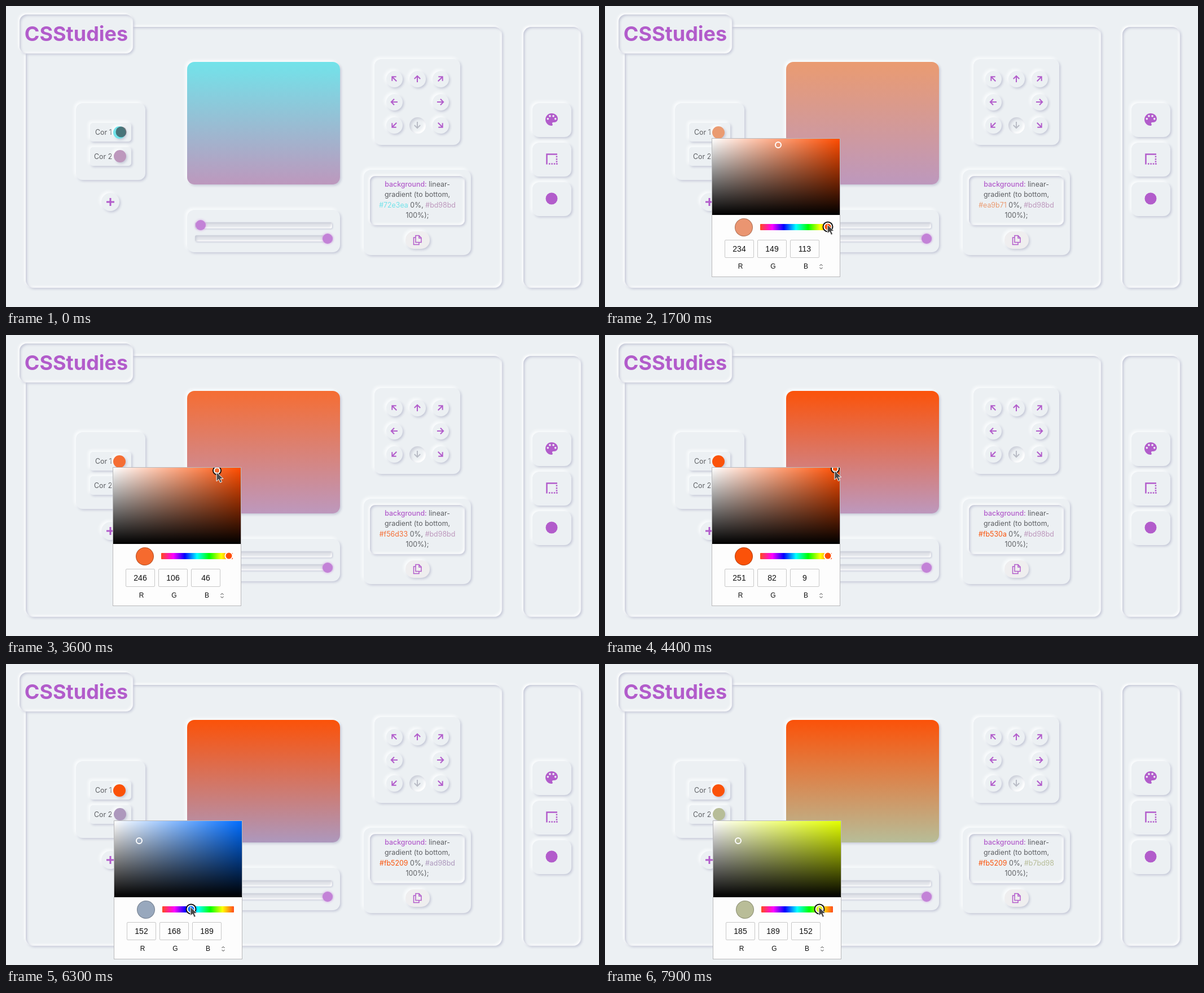
An HTML page that plays this animation: 1051 by 533 pixels, repeating every 8 s.

```html
<!DOCTYPE html>
<html lang="pt">
<head>
<meta charset="utf-8">
<title>CSStudies</title>
<style>
html, body { margin: 0; width: 100%; height: 100%; overflow: hidden; background: #ecf0f3; }
#stage { position: relative; width: 1051px; height: 533px; overflow: hidden;
  font: 12.4px/18.3px Inter, sans-serif; color: #5d5f63; --purple: #b25ccb; }
#stage div, #stage svg { position: absolute; box-sizing: border-box; }
.raised, .ring { background: #ecf0f3; }
.raised { box-shadow: -3px -3px 5px #fafcfd, 2px 2px 4px #c3c6d6; }
.ring { box-shadow: -2px -2px 4px #fff, 2px 2px 4px #c3c6d6,
  inset 2px 2px 4px #c3c6d6, inset -2px -2px 4px #fff; }
.pressed { box-shadow: inset 3px 3px 4px #cdd0da, inset -3px -3px 4px #fff; }
.track { background: #e4e6eb; box-shadow: 1px 1px 3px #c3c6d6,
  inset 2px 2px 4px #c6c9d5, inset -2px -2px 3px #fff; }
.thumb { background: #c382d7; box-shadow: 0 0 4px #d49be3; }
.title { font: bold 36px/69px Inter, sans-serif; color: var(--purple); text-align: center; }
.code { text-align: center; padding-top: 6px; white-space: nowrap; }
.code b { font-weight: 500; color: var(--purple); }
.code i { font-style: normal; }
.row { line-height: 33px; white-space: nowrap; }
.picker { background: #fdfdfd; border: 1px solid #b9b9bb;
  font: 14px/30px "Liberation Sans", Arial, sans-serif; color: #111; text-align: center; }
.area { overflow: hidden; }
.sample { border: 1px solid rgba(0, 0, 0, .25); }
.field { border: 1px solid #c8c8c8; border-radius: 2px; }
.name { font-size: 12px; }
.knob { border: 2px solid #fff; transform: translate(-50%, -50%); }
.knob.active { box-shadow: 0 0 0 2px #111; }
.hues { background: linear-gradient(90deg, #ff4a1c, #f0f 17%, #00f 33%, #0ff 50%, #0f0 67%, #ff0 84%, #ff4a1c); }
.focus { background: rgba(70, 165, 235, .5); }
</style>
</head>
<body>
<div id="stage"></div>
<script>
const stage = document.getElementById('stage');

function box(x, y, w, h, r, cls = '', html = '', parent = stage) {
  const el = document.createElement('div');
  el.className = cls;
  el.style.cssText = `left:${x}px;top:${y}px;width:${w}px;height:${h}px;border-radius:${r}px`;
  el.innerHTML = html;
  return parent.appendChild(el);
}
const disc = (x, y, r, cls, parent) => box(x - r, y - r, 2 * r, 2 * r, r, cls, '', parent);
function svg(content) {
  stage.insertAdjacentHTML('beforeend',
    `<svg width="1051" height="533" style="left:0;top:0;overflow:visible" fill="none"
      stroke="#b25ccb" stroke-width="2">${content}</svg>`);
  return stage.lastElementChild;
}

// Page
box(35, 37, 844, 462, 14, 'ring');
box(917, 37, 102, 462, 14, 'ring');
box(24, 15, 201, 69, 13, 'ring title', 'CSStudies');
box(124, 172, 123, 136, 12, 'raised');
const swatches = [0, 1].map(i => {
  const y = 207 + 42.5 * i;
  box(149, y, 73, 33, 5, 'raised');
  box(158 - 2 * i, y, 40, 33, 0, 'row', `Cor ${i + 1}`);
  return disc(200.5 + 1.5 * i, y + 16.5, 11, 'raised');
});
disc(185, 347, 16, 'raised');
const preview = box(321, 99, 271, 217, 13, 'raised');
box(321, 361, 271, 75, 13, 'raised');
for (const i of [0, 1]) {
  box(335, 383 + 23 * i, 243, 11, 3, 'track');
  disc(344.5 + 225 * i, 388 + 23.5 * i, 9, 'thumb');
}
box(653, 94, 152, 152, 12, 'raised');
box(634, 290, 190, 151, 13, 'raised');
const code = box(645, 301, 168, 87, 9, 'ring code',
  '<b>background:</b> linear-<br>gradient (to bottom,<br><i></i> 0%, <i></i><br>100%);');
const codeColors = code.querySelectorAll('i');
box(708, 399, 43, 31, 15, 'raised').style.background = '#efeeef';
for (let i = 0; i < 3; i++) box(933, 172 + 70 * i, 69, 60, 12, 'raised');

let icons = '';
for (let i = 0; i < 8; i++) {
  const angle = 45 * i, rad = angle * Math.PI / 180, down = i === 4;
  const x = 729 + 41 * Math.round(Math.sin(rad)), y = 170 - 41 * Math.round(Math.cos(rad));
  disc(x, y, 14.5, down ? 'pressed' : 'raised');
  icons += `<path d="M0 6V-5M-5.2 0L0-5.2L5.2 0" stroke="${down ? '#b9bcc6' : '#b25ccb'}"
    transform="translate(${x} ${y}) rotate(${angle})"/>`;
}
// Plus, palette, border, link and copy icons
svg(icons + `
  <path d="M185 340v14M178 347h14" stroke-width="3"/>
  <g transform="translate(952.4 186.4) scale(1.22)" stroke="none" fill="#b25ccb">
    <path d="M12 3a9 9 0 0 0 0 18c.8 0 1.5-.7 1.5-1.5 0-.4-.2-.7-.4-1-.2-.3-.4-.6-.4-1 0-.8.7-1.5 1.5-1.5H16a5 5 0 0 0 5-5c0-4.4-4-8-9-8z"/>
    <path d="M6.5 11h0M9.5 7h0M14.5 7h0M17.5 11h0" stroke="#ecf0f3" stroke-width="3" stroke-linecap="round"/></g>
  <path d="M958.5 280.5V262.5H977" stroke-width="2.5"/>
  <path d="M962 279.5H978M976 265.5V280" stroke-width="2.5" stroke-dasharray="2.5 1.9"/>
  <circle cx="967" cy="341" r="10.5" fill="#b25ccb" stroke="none"/>
  <path d="M726 406.5h6l4 4v8h-10zM732 406.5v4.5h4M726 410h-3.5v12.5h9.5v-4" stroke-width="1.5"/>`);

// Colour pickers
function makePicker(x, y) {
  const root = box(x, y, 228, 246, 0, 'picker');
  const add = (...args) => box(...args, root);
  const area = add(0, 0, 226, 135, 0, 'area', '');
  const point = disc(0, 0, 6, 'knob', area);
  const sample = disc(55.5, 157, 16, 'sample', root);
  add(85, 151, 127, 11, 1, 'hues', '');
  const hue = add(0, 156, 15, 15, 8, 'knob', '');
  const fields = [...'RGB'].map((name, i) => {
    add(24 + 58 * i, 211, 52, 30, 0, 'name', name);
    return add(22 + 58 * i, 179, 52, 32, 2, 'field', '');
  });
  add(188, 211, 10, 30, 0, '', `<svg width="10" height="30" style="left:0;top:0" fill="none" stroke="#333">
    <path d="M2.5 14L5 11.5L7.5 14M2.5 17L5 19.5L7.5 17"/></svg>`);
  return { x, y, root, area, point, sample, hue, fields };
}
const focusBoxes = swatches.map((_, i) => box(190 + i, 212 + 43 * i, 22, 22, 0, 'focus'));
const pickers = [makePicker(189, 234), makePicker(191, 277)];
const cursor = svg(`<circle r="9.5" fill="rgba(48,50,56,.63)" stroke="none"/>
  <path d="M0 0V16L4 12.5L6.5 18.5L9.5 17L7 11.5H12Z" fill="#484848" stroke="#fff" stroke-width="1"/>`);
const [touch, pointer] = cursor.children;

// Motion
const progress = (t, start, end) => Math.max(0, Math.min(1, (t - start) / (end - start)));
const ease = (t, start, end) => {
  const p = progress(t, start, end);
  return p * p * (3 - 2 * p);
};
const mix = (a, b, p) => a.map((v, i) => v + (b[i] - v) * p);
const within = (t, a, b) => t >= a && t < b;

// Each drag runs from start to end and leaves the given hue, saturation and value
const first = t => [
  [1100, 1642, [18, .517, .918]],
  [2000, 2900, [18, .741, .953]],
  [3100, 4400, [18.1, .964, .984]]
].reduce((hsv, [start, end, to]) => mix(hsv, to, ease(t, start, end)), [183.5, .513, .918]);
const second = t => {
  const hue = 300 - 243.2 * ease(t, 6100, 6600) + 12.9 * ease(t, 7200, 7500) - 3.2 * ease(t, 7800, 7900);
  return [hue, .1958, .7412];
};
const choices = [first, second];

const toRgb = ([h, s, v]) => [5, 3, 1].map(n => {
  const k = (n + h / 60) % 6;
  return Math.round(255 * v * (1 - s * Math.max(0, Math.min(k, 4 - k, 1))));
});
const toHex = rgb => '#' + rgb.map(c => c.toString(16).padStart(2, '0')).join('');

// Draws a picker and returns where its two knobs are on the stage
function drawPicker(p, hsv, opacity, hueActive, pointActive) {
  const [h, s, v] = hsv, rgb = toRgb(hsv), pure = toHex(toRgb([h, 1, 1]));
  const px = s * 226, py = (1 - v) * 135, hx = 84.5 + 127 * (1 - h / 360);
  p.root.style.opacity = opacity;
  p.area.style.background =
    `linear-gradient(to top, #000, transparent), linear-gradient(to right, #fff, transparent), ${pure}`;
  p.point.style.left = px + 'px';
  p.point.style.top = py + 'px';
  p.hue.style.left = hx + 'px';
  p.hue.style.background = pure;
  p.sample.style.backgroundColor = toHex(rgb);
  p.fields.forEach((field, c) => field.textContent = rgb[c]);
  p.hue.classList.toggle('active', hueActive);
  p.point.classList.toggle('active', pointActive);
  return { hue: [p.x + hx, p.y + 153], point: [p.x + px, p.y + py + 4] };
}

function frame(now) {
  const t = Math.floor(now % 8000 / 100) * 100;
  // The page follows the picker one step late
  const colors = choices.map(hsv => toHex(toRgb(hsv(t - 100))));
  const opening = [0, 5000].map(delay => progress(t - delay, 450, 825));
  colors.forEach((color, i) => {
    swatches[i].style.background = codeColors[i].style.color = color;
    codeColors[i].textContent = color;
    focusBoxes[i].style.display = opening[i] % 1 ? '' : 'none';
  });
  preview.style.background = `linear-gradient(${colors})`;

  const opacity = [opening[0] - progress(t, 4550, 4850), opening[1]];
  const a = drawPicker(pickers[0], first(t), opacity[0], within(t, 1100, 1800), within(t, 2000, 4600));
  const b = drawPicker(pickers[1], second(t), opacity[1], t >= 6100, false);

  let at = mix([204, 223], a.hue, ease(t, 500, 1100));
  at = mix(at, a.point, ease(t, 1700, 2000));
  at = mix(at, [209, 262], ease(t, 4400, 5100));
  at = mix(at, b.hue, ease(t, 5500, 6100));
  const overPicker = Math.max(...opacity) > .5;
  cursor.style.transform = `translate(${at[0]}px, ${at[1]}px)`;
  touch.style.display = overPicker ? 'none' : '';
  pointer.style.display = overPicker ? '' : 'none';
  requestAnimationFrame(frame);
}
requestAnimationFrame(frame);
</script>
</body>
</html>
```
